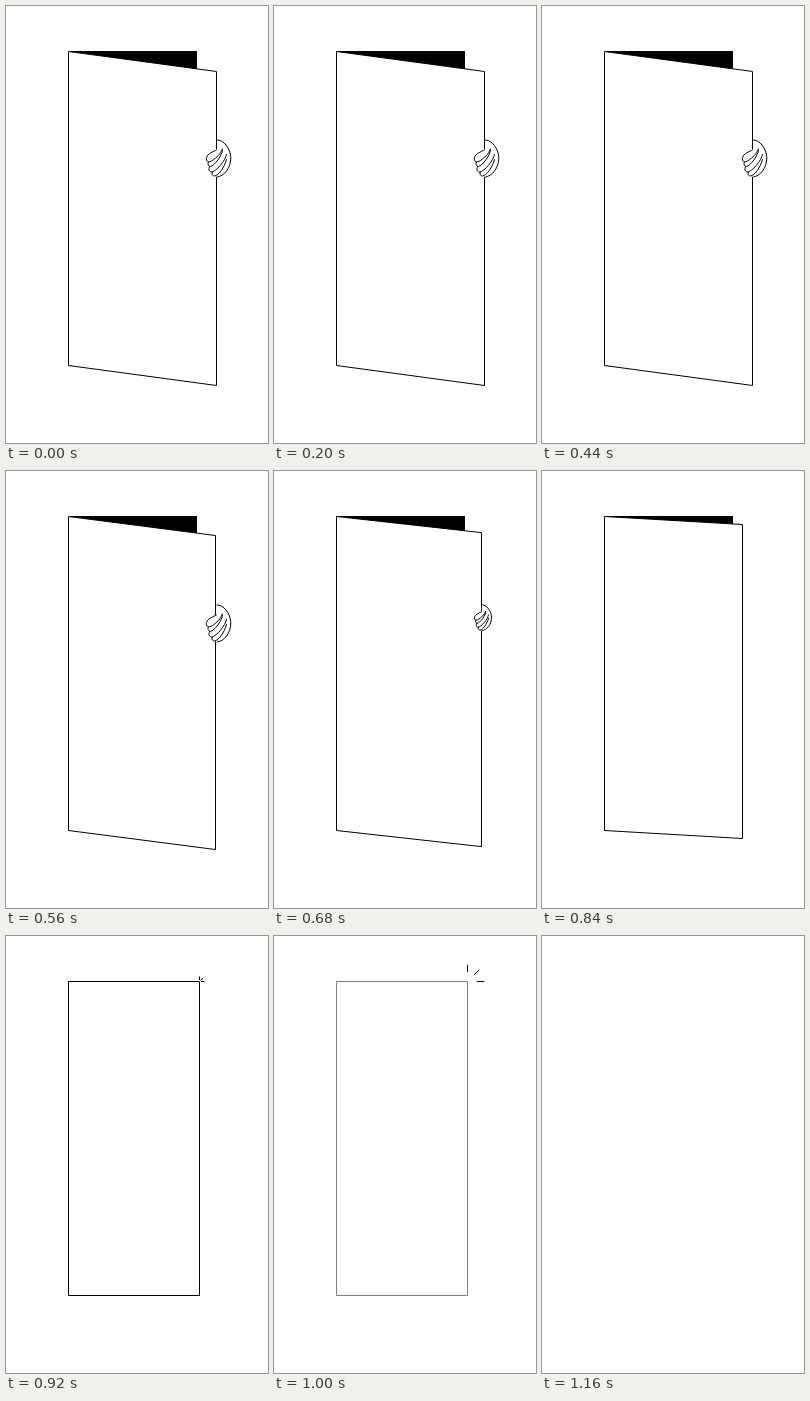
Recreate the animation shown at these times as an HTML page. Size 262 px wide and 437 px high, loop 1.56 s.

```html
<!DOCTYPE html>
<html lang="en">
<head>
<meta charset="utf-8">
<title>Closing door</title>
<style>
  html, body { margin: 0; width: 100%; height: 100%; overflow: hidden; background: #fff; }
  svg { display: block; width: 100%; height: 100%; }
  #door, #hand path { fill: #fff; stroke: #000; stroke-width: 1; vector-effect: non-scaling-stroke; }
  #hand path { stroke-linecap: round; stroke-linejoin: round; }
  #hand .line { fill: none; }
  #sparks { fill: none; stroke: #000; stroke-width: 1; }
</style>
</head>
<body>
<svg viewBox="0 0 262 437">
  <g id="scene">
    <rect id="gap" x="63" y="45" width="128" height="314"/>
    <polygon id="door"/>
    <!-- drawn around the point where the palm meets the door edge -->
    <g id="hand">
      <path d="M.5 .5C7 0 14 9 14.3 18C14.5 28 8 37 .5 37.5L-4 34L-2 12L.5 9Z" stroke="none" style="stroke:none"/>
      <path class="line" d="M.5 .5C7 0 14 9 14.3 18C14.5 28 8 37 .5 37.5"/>
      <path d="M8 26C6 32 3 37 0 37C-3 37 -2 33 1 29Z" style="stroke:none"/>
      <path d="M10 20C8 28 2 36 -2 36.5C-6 36 -5 32 -1 28L7 18"/>
      <path d="M10 15C9 21 0 32 -5 32.5C-9 32 -8 27 -4 23L5 14"/>
      <path d="M6 10C6 16 -2 26 -6 27C-10 26 -9 22 -5 19"/>
      <path d="M6 9.5C4 15 0 18 -4 21C-8 23.5 -11 22 -10 18C-9 14 -3 12 0 10.5"/>
    </g>
  </g>
  <path id="sparks"/>
</svg>
<script>
  const LOOP = 1560, STEP = 40, SLAM = 920, END = 1160;
  const el = id => document.getElementById(id);
  const scene = el('scene'), gap = el('gap'), door = el('door'), hand = el('hand'), sparks = el('sparks');
  const clamp = v => Math.min(1, Math.max(0, v));

  function ray(angle, from, to) {
    const c = Math.cos(angle), s = Math.sin(angle);
    const at = r => (193.5 + c * r).toFixed(2) + ' ' + (45.5 - s * r).toFixed(2);
    return `M${at(from)}L${at(to)}`;
  }

  function draw(t) {
    // 1 is ajar, 0 is shut
    const open = t < SLAM ? 1 - clamp((t - 400) / 540) ** 2.5 : 0;
    const x = Math.round(193 + 17 * open) + 0.5, drop = 20 * open;
    door.setAttribute('points', `62.5,45.5 ${x},${45.5 + drop} ${x},${359.5 + drop} 62.5,359.5`);
    gap.style.display = open ? '' : 'none';

    const size = 1 - 0.3 * clamp((t - 560) / 240) ** 1.7 * 2 ** 1.7;
    hand.style.display = size > 0.1 ? '' : 'none';
    hand.setAttribute('transform', `translate(${t < 600 ? 210.5 : x} 133.5) scale(${Math.max(size, 0.1)})`);

    scene.style.opacity = 1 - clamp((t - SLAM) / 160);

    if (t >= SLAM && t < END) {
      const u = (t - SLAM) / 200;
      const head = 5 + 23 * (1 - (1 - u) ** 1.4);
      const tail = head - 3.5 - 4 * Math.sin(Math.PI * u);
      sparks.setAttribute('d', [0, 0.25, 0.5].map(a => ray(a * Math.PI, tail, head)).join(''));
    } else {
      sparks.setAttribute('d', '');
    }
    scene.style.display = t < 1080 ? '' : 'none';
  }

  const start = performance.now();
  function tick(now) {
    const t = Math.max(0, now - start) % LOOP;
    draw(Math.floor(t / STEP) * STEP);
    requestAnimationFrame(tick);
  }
  draw(0);
  requestAnimationFrame(tick);
</script>
</body>
</html>
```
